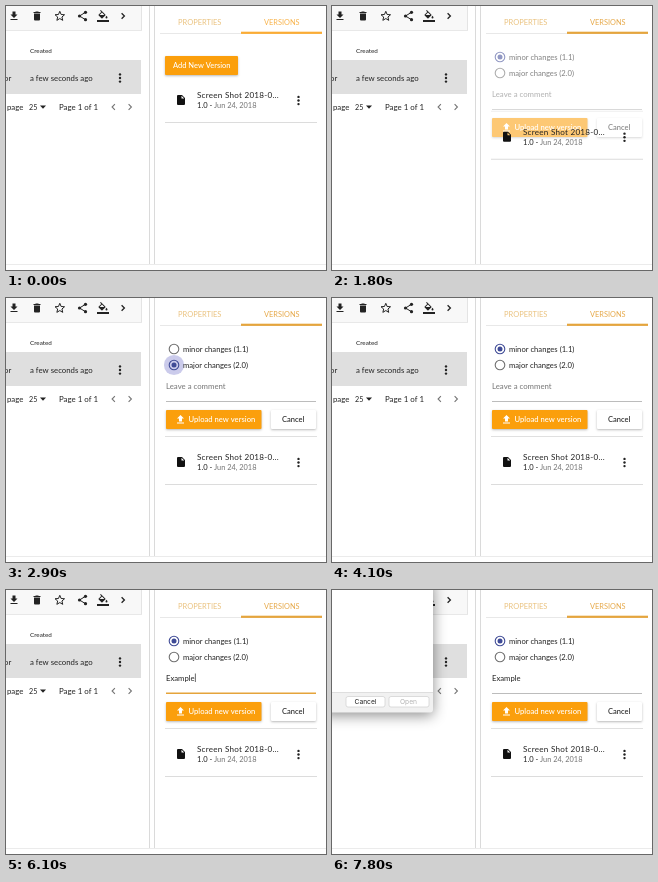
An HTML page with a canvas that plays this animation: 320x264 px, repeating every 8 s.

```html
<!DOCTYPE html>
<html lang="en">
<head>
<meta charset="utf-8">
<title>Upload a new version</title>
<style>
  html, body { margin: 0; width: 100%; height: 100%; overflow: hidden; background: #fff; }
  canvas { display: block; width: 320px; height: 264px; }
</style>
</head>
<body>
<canvas id="stage"></canvas>
<script>
const W = 320, H = 264, LOOP = 8000, STEP = 100;
const INK = '#222', GREY = '#757575', ORANGE = '#fb9f0c', INDIGO = '#3f4b96';
const UI = 'Lato, sans-serif', SYSTEM = 'Inter, sans-serif';
const COMMENT = 'Example';
const KEY_TIMES = [5300, 5500, 5600, 5700, 5900, 6000, 6100];

const canvas = document.getElementById('stage');
const ctx = canvas.getContext('2d');
const dpr = window.devicePixelRatio || 1;
canvas.width = W * dpr;
canvas.height = H * dpr;

// Icons on a 24-unit grid
const ICONS = {
  download: new Path2D('M19 9h-4V3H9v6H5l7 7 7-7zM5 18v2h14v-2z'),
  upload: new Path2D('M9 16h6v-6h4l-7-7-7 7h4zM5 18v2h14v-2z'),
  trash: new Path2D('M6 19q0 2 2 2h8q2 0 2-2V7H6zM19 4h-3.5l-1-1h-5l-1 1H5v2h14z'),
  file: new Path2D('M6 2q-2 0-2 2v16q0 2 2 2h12q2 0 2-2V8l-6-6zM13 9V3.5L18.5 9z'),
  bucket: new Path2D('M7.6 0L6.2 1.4l2.4 2.4L3.4 9q-.9 1 0 2l5.5 5.5q1 .9 2 0L16.6 11q.9-1 0-2zM5.2 10L10 5.2 14.8 10zM19 11.5q-4 5 0 5.5 4-.5 0-5.5zM0 20h24v4H0z')
};

const clamp = v => Math.max(0, Math.min(1, v));
const smooth = v => v * v * (3 - 2 * v);
const easeOut = v => 1 - (1 - v) ** 2;

function text(str, x, y, size, color = INK, font = UI, weight = 400) {
  ctx.font = `${weight} ${size}px ${font}`;
  ctx.fillStyle = color;
  ctx.fillText(str, x, y);
}

function rect(x, y, w, h, color) {
  ctx.fillStyle = color;
  ctx.fillRect(x, y, w, h);
}

function roundRect(x, y, w, h, r) {
  ctx.beginPath();
  ctx.roundRect(x, y, w, h, r);
}

function disc(x, y, r, color) {
  ctx.fillStyle = color;
  ctx.beginPath();
  ctx.arc(x, y, r, 0, Math.PI * 2);
  ctx.fill();
}

function ring(x, y, r, color, width) {
  ctx.strokeStyle = color;
  ctx.lineWidth = width;
  ctx.beginPath();
  ctx.arc(x, y, r, 0, Math.PI * 2);
  ctx.stroke();
}

function polyline(points, color, width) {
  ctx.strokeStyle = color;
  ctx.lineWidth = width;
  ctx.beginPath();
  points.forEach(([x, y]) => ctx.lineTo(x, y));
  ctx.stroke();
}

function icon(name, x, y, scale, color = INK) {
  ctx.save();
  ctx.translate(x - 12 * scale, y - 12 * scale);
  ctx.scale(scale, scale);
  ctx.fillStyle = color;
  ctx.fill(ICONS[name], 'evenodd');
  ctx.restore();
}

function raised(x, y, w, h, color) {
  ctx.save();
  ctx.shadowColor = 'rgba(0,0,0,.28)';
  ctx.shadowBlur = 2.5 * dpr;
  ctx.shadowOffsetY = dpr;
  ctx.fillStyle = color;
  roundRect(x, y, w, h, 1);
  ctx.fill();
  ctx.restore();
}

function kebab(x, y) {
  for (const dy of [-3.6, 0, 3.6]) disc(x, y + dy, 1.2, INK);
}

function chevron(x, y, size, dir, color, width) {
  const dx = size / 2 * dir;
  polyline([[x - dx, y - size], [x + dx, y], [x - dx, y + size]], color, width);
}

function star(x, y, r) {
  const points = Array.from({ length: 11 }, (_, i) => {
    const a = i * Math.PI / 5 - Math.PI / 2, d = i % 2 ? r * 0.45 : r;
    return [x + d * Math.cos(a), y + d * Math.sin(a)];
  });
  polyline(points, INK, 1);
}

function share(x, y) {
  polyline([[x + 3, y - 3.7], [x - 3, y], [x + 3, y + 3.7]], INK, 1);
  for (const [dx, dy] of [[3, -3.7], [-3, 0], [3, 3.7]]) disc(x + dx, y + dy, 1.6, INK);
}

function drawTable() {
  rect(0, 0, 135, 24, '#f8f8f8');
  rect(135, 0, 1, 25, '#e4e4e4');
  rect(0, 24, 136, 1, '#e8e8e8');
  icon('download', 8, 10, 0.5);
  icon('trash', 31, 10, 0.5);
  star(53.8, 10.3, 5);
  share(76.5, 10);
  icon('bucket', 97, 10, 0.5);
  chevron(117, 10, 2.8, 1, INK, 1.3);

  text('Created', 24, 47, 6.3);
  rect(0, 54, 135, 34, '#dfdfdf');
  text('or', -2, 74.5, 7.8);
  text('a few seconds ago', 24, 74.5, 7.8);
  kebab(114, 72);

  text('page', 1, 103.5, 7.8);
  text('25', 23, 103.5, 7.2);
  ctx.fillStyle = INK;
  ctx.beginPath();
  ctx.moveTo(34, 99.5);
  ctx.lineTo(40, 99.5);
  ctx.lineTo(37, 102.7);
  ctx.fill();
  text('Page 1 of 1', 53, 103.5, 7.9);
  chevron(107.5, 101, 2.8, -1, GREY, 1.1);
  chevron(124, 101, 2.8, 1, GREY, 1.1);
}

function drawFrame(t) {
  const hovered = t >= 1000;
  rect(143, 0, 1, 258, '#dadada');
  rect(148, 0, 1, 258, '#dadada');
  rect(0, 258, W, 1, '#ebebeb');
  rect(154, 27, 162, 1, '#e8e8e8');
  rect(235, 25.7, 81, 2.2, hovered ? '#e5a53d' : '#fbac35');
  text('PROPERTIES', 172, 18.5, 7.5, '#eac27f');
  text('VERSIONS', 258, 18.5, 7.4, hovered ? '#e6a94a' : '#f8b34b');
}

function drawVersion(dy) {
  ctx.save();
  ctx.translate(0, dy);
  icon('file', 175, 94, 0.5, '#111');
  ctx.letterSpacing = '0.25px';
  text('Screen Shot 2018-0...', 191, 92.2, 8.1);
  ctx.letterSpacing = '0px';
  text('1.0 -', 191, 102, 7.6);
  text('Jun 24, 2018', 208, 102, 7.4, GREY);
  kebab(292.5, 94.5);
  rect(159, 116, 152, 1, '#dcdcdc');
  ctx.restore();
}

function radio(y, label, selected) {
  ring(168, y, 4.8, selected ? INDIGO : '#707070', 1.1);
  if (selected) disc(168, y, 2.5, INDIGO);
  text(label, 177, y + 2.6, 7.65);
}

function radioRipple(t, y, start, fade, end) {
  if (t < start || t >= end) return;
  const r = 12 * easeOut(clamp((t - start + STEP) / 500));
  const alpha = 0.27 * clamp((end - t) / (end - fade));
  disc(168, y, r, `rgba(63,63,181,${alpha})`);
}

function drawComment(t) {
  const typed = COMMENT.slice(0, KEY_TIMES.filter(k => t >= k).length);
  if (typed) text(typed, 160, 90.5, 7.7);
  else text('Leave a comment', 160, 90.5, 7.8, GREY);

  rect(160, 103, 150, 1, '#bcbcbc');
  if (t < 4400 || t >= 6900) return;
  const half = 75 * easeOut(clamp((t - 4300) / 300));
  rect(235 - half, 102.5, 2 * half, 1.5, '#e5a43b');

  const blinkOff = (t >= 4900 && t < 5100) || t >= 6700;
  if (!blinkOff) {
    ctx.font = `400 7.7px ${UI}`;
    rect(160.3 + ctx.measureText(typed).width, 83.5, 0.8, 8.5, '#444');
  }
}

function drawUploadButton(t) {
  raised(160, 112, 95.5, 19, ORANGE);
  if (t >= 6900 && t < 7800) {
    ctx.save();
    roundRect(160, 112, 95.5, 19, 1);
    ctx.clip();
    disc(197, 121.5, t < 7000 ? 10 : 19, 'rgba(255,255,255,.3)');
    ctx.restore();
  }
  icon('upload', 174.5, 121.5, 0.5, '#fff');
  text('Upload new version', 182.5, 124.3, 7.65, '#fff', UI, 500);
}

function drawForm(t, open) {
  radioRipple(t, 67, 2700, 3000, 3500);
  radioRipple(t, 51, 3600, 3700, 4100);
  const major = t >= 2700 && t < 3600;
  radio(51, 'minor changes (1.1)', !major);
  radio(67, 'major changes (2.0)', major);
  drawComment(t);
  rect(159, 68 + 70 * open, 152, 1, '#e0e0e0');
  drawUploadButton(t);
  raised(265, 112, 45, 19, '#fff');
  text('Cancel', 276, 124.3, 7.5, INK, UI, 500);
  // A white veil fades the form in as one group
  rect(154, 36, 162, 104, `rgba(255,255,255,${(1 - open) * 0.9})`);
}

function dialogButton(x, w, label, labelX, color) {
  ctx.fillStyle = '#fff';
  ctx.strokeStyle = '#cfcfcf';
  ctx.lineWidth = 0.7;
  roundRect(x, 106.5, w, 10.5, 2);
  ctx.fill();
  ctx.stroke();
  text(label, labelX, 114.2, 6.7, color, SYSTEM);
}

function drawDialog(t) {
  if (t < 7400) return;
  ctx.save();
  ctx.globalAlpha = t < 7500 ? 0.55 : 1;
  ctx.save();
  ctx.shadowColor = 'rgba(0,0,0,.45)';
  ctx.shadowBlur = 14 * dpr;
  ctx.shadowOffsetY = 3 * dpr;
  ctx.fillStyle = '#f1f1f1';
  roundRect(-10, -10, 111, 132.5, 3);
  ctx.fill();
  ctx.restore();
  rect(0, 0, 101, 102, '#fff');
  rect(0, 102, 101, 0.8, '#dadada');
  dialogButton(14, 39, 'Cancel', 22.5, '#222');
  dialogButton(57, 40, 'Open', 68, '#b4b4b4');
  ctx.restore();
}

function draw(now) {
  const t = Math.floor((now % LOOP) / STEP) * STEP;
  ctx.setTransform(dpr, 0, 0, dpr, 0, 0);
  rect(0, 0, W, H, '#fff');
  drawTable();
  drawFrame(t);

  const open = t < 1600 ? 0 : smooth(clamp((t - 1490) / 600));
  if (open) {
    drawForm(t, open);
  } else {
    raised(159, 50, 73, 19, ORANGE);
    text('Add New Version', 167, 62.3, 7.5, '#fff', UI, 500);
  }
  drawVersion(70 * open);
  drawDialog(t);
}

const start = performance.now();
function tick() {
  draw(performance.now() - start);
  requestAnimationFrame(tick);
}
tick();
</script>
</body>
</html>
```
